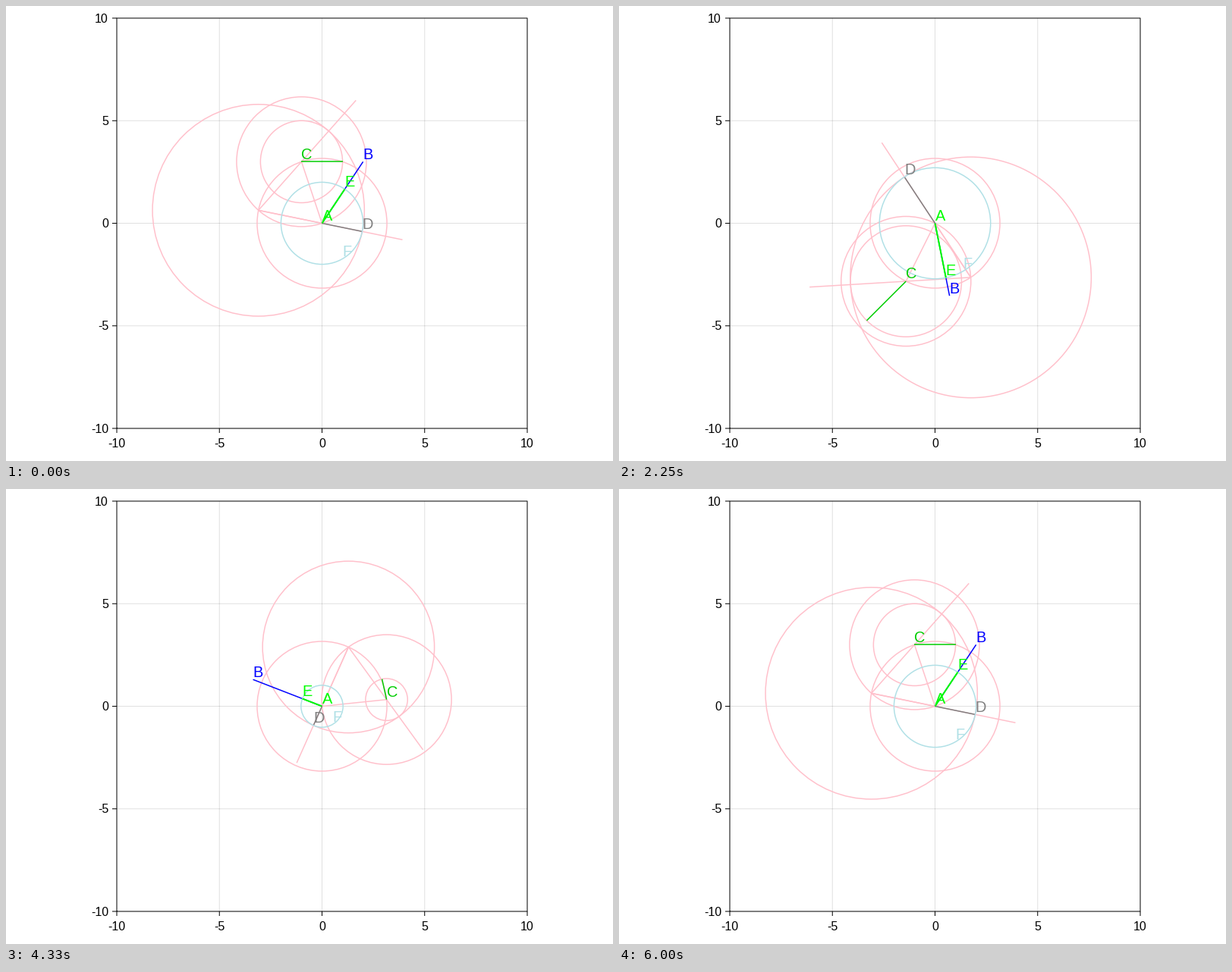
A matplotlib script that plays this animation: 800x600 px, repeating every 6.04 s.

```python
import numpy as np
import matplotlib.pyplot as plt
from matplotlib.animation import FuncAnimation

W, H, DPI = 800, 600, 100
PX = 72 / DPI                     # points per pixel
LOOP_MS, FRAMES = 6040, 145
LEFT, RIGHT, TOP, BOTTOM = 146, 687, 16, 557
GREEN, LIME, GRAY, PALE = "#00cd00", "#00ff00", "#808080", "powderblue"

plt.rcParams["font.family"] = "Liberation Sans"
fig = plt.figure(figsize=(W / DPI, H / DPI), dpi=DPI, facecolor="white")
ax = fig.add_axes([LEFT / W, 1 - BOTTOM / H, (RIGHT - LEFT) / W, (BOTTOM - TOP) / H])
ax.set(xlim=(-10, 10), ylim=(-10, 10))
ax.axis("off")


def rule(x, y, **style):
    line, = ax.plot(x, y, lw=PX, clip_on=False, snap=False,
                    solid_capstyle="butt", **style)
    return line


def tick_label(v, x, y, ha):
    fig.text(x / W, 1 - y / H, str(v), fontsize=16 * PX, ha=ha, va="baseline")


def draw_axes():
    unit = (RIGHT - LEFT) / 20
    tick = 10 + 6 / unit
    for v in range(-10, 11, 5):
        if abs(v) < 10:
            rule([v, v], [-10, 10], color="black", alpha=0.12, zorder=0)
            rule([-10, 10], [v, v], color="black", alpha=0.12, zorder=0)
        rule([v, v], [-tick, -10], color="black", zorder=9)
        rule([-tick, -10], [v, v], color="black", zorder=9)
        tick_label(v, LEFT + (v + 10) * unit, 581.5, "center")
        tick_label(v, 135, BOTTOM - (v + 10) * unit + 5.7, "right")
    rule([-10, 10, 10, -10, -10], [-10, -10, 10, 10, -10], color="black", zorder=9)


def segment(color, z, width=1.5):
    line, = ax.plot([], [], color=color, lw=width * PX, zorder=z,
                    solid_capstyle="butt")
    return line


def circle(color, z):
    return ax.add_patch(plt.Circle((0, 0), 1, fill=False, ec=color,
                                   lw=1.5 * PX, zorder=z))


def label(text, color, z):
    return ax.annotate(text, (0, 0), xytext=(0, 3.6 * PX),
                       textcoords="offset points", fontsize=20 * PX,
                       color=color, ha="left", va="baseline", zorder=z)


def join(line, p, q):
    line.set_data([p.real, q.real], [p.imag, q.imag])


def place(ring, center, radius):
    ring.set_center((center.real, center.imag))
    ring.set_radius(radius)


draw_axes()
rings = [circle("pink", 1) for _ in range(4)]
sides = [segment("pink", 1) for _ in range(4)]
copy_ring = circle(PALE, 3)
seg_b = segment("blue", 2)
seg_c = segment(GREEN, 2)
seg_d = segment(GRAY, 2.5)
seg_e = segment(LIME, 4, 2)
names = {n: label(n, c, 5 + k / 10) for k, (n, c) in enumerate(
    [("F", PALE), ("A", LIME), ("B", "blue"), ("C", GREEN), ("D", GRAY), ("E", LIME)])}


def update(i):
    theta = 2 * np.pi * i / (FRAMES - 1)
    turn = np.exp(1j * theta)
    r = 2 + np.sin(theta)

    a = 0j
    b = (2 + 3j) / turn
    c = (-1 + 3j) * turn
    apex = c * np.exp(1j * np.pi / 3)      # equilateral triangle on AC
    side = abs(c)
    out_a = -apex / side
    out_c = (c - apex) / side
    d = r * out_a
    e = r * b / abs(b)
    f = r * np.exp(-1j * np.pi / 3)

    for ring, center, radius in zip(rings, (a, c, c, apex), (side, side, r, side + r)):
        place(ring, center, radius)
    place(copy_ring, a, r)

    join(sides[0], a, c)
    join(sides[1], a, apex)
    join(sides[2], apex, (r + 2) * out_a)
    join(sides[3], apex, c + (r + 2) * out_c)
    join(seg_b, a, b)
    join(seg_c, c, c + r / turn)
    join(seg_d, a, d)
    join(seg_e, a, e)

    for name, p in zip("ABCDEF", (a, b, c, d, e, f)):
        names[name].xy = (p.real, p.imag)
    return [*rings, *sides, copy_ring, seg_b, seg_c, seg_d, seg_e, *names.values()]


anim = FuncAnimation(fig, update, frames=FRAMES, interval=LOOP_MS / FRAMES,
                     repeat=True, repeat_delay=0, blit=False)
plt.show()
```
